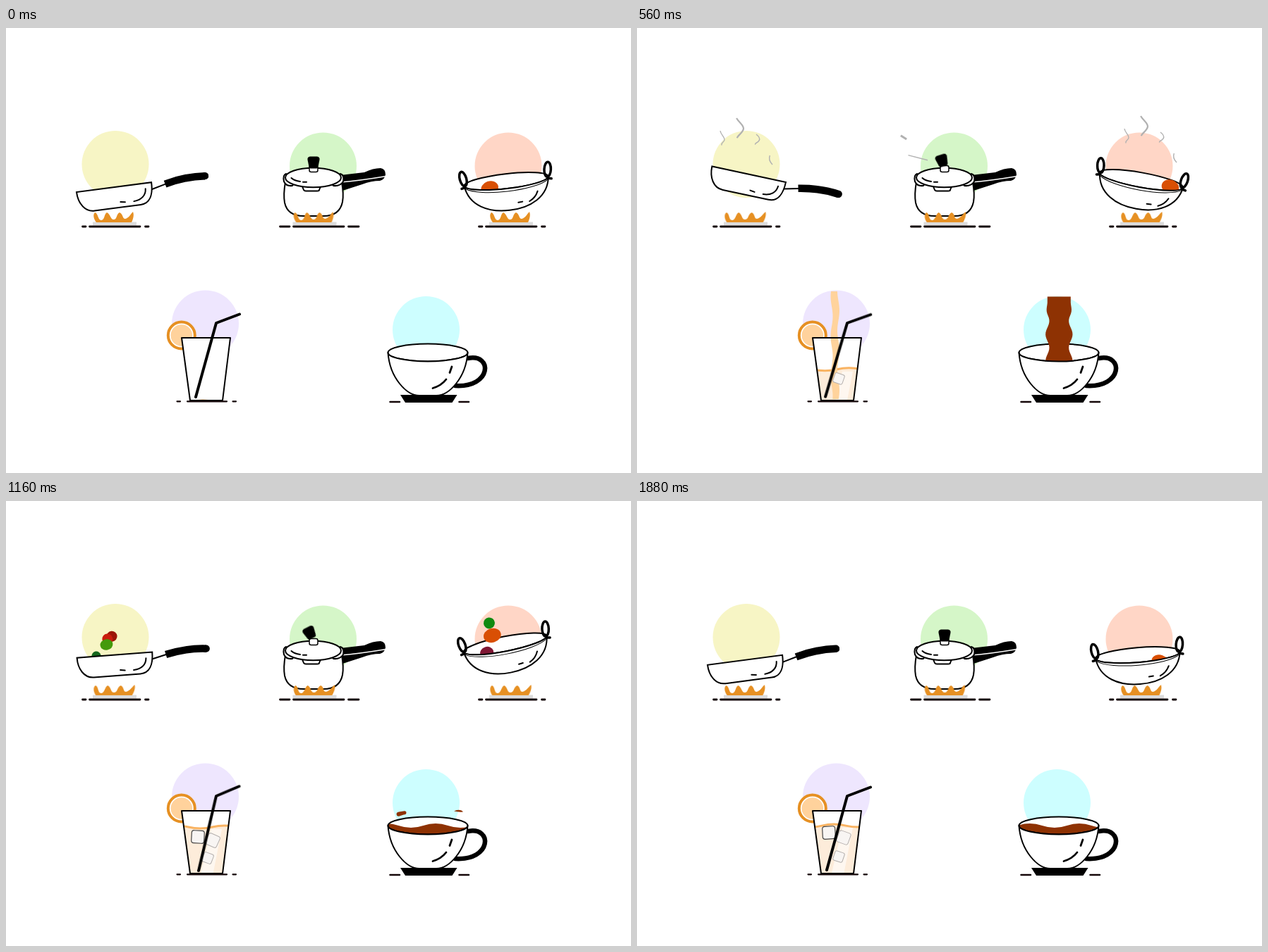
An HTML page for the animation above (1.92 s loop, 886x632 px).

```html
<!DOCTYPE html>
<html lang="en">
<head>
<meta charset="utf-8">
<title>Kitchen loop</title>
<style>
html, body { margin: 0; width: 100%; height: 100%; overflow: hidden; background: #fff; }
svg { display: block; width: 886px; height: 632px; }
.ink { fill: none; stroke: #000; stroke-width: 2; stroke-linecap: round; stroke-linejoin: round; }
.thin { stroke-width: 1; }
.thick { stroke-width: 3.5; }
.paper { fill: #fff; }
.ground { stroke: #140608; stroke-width: 2.8; }
.coffee { fill: #8e3203; }
.cube { fill: #f8f5f3; stroke: #444; stroke-width: 1.2; }
.pale { stroke: #b5b0ae; stroke-width: 1; }

/* A dash of --len slides along each trail, from before its start to past its end. */
.trail {
  fill: none; stroke: #b1b1b1; stroke-width: var(--w, 1.4);
  stroke-dasharray: var(--len, 60) 200; stroke-dashoffset: var(--len, 60);
  animation: drift 1920ms linear var(--wait) infinite;
}
.puff { animation-name: burst; }
@keyframes drift { 0% { stroke-dashoffset: var(--len, 60); } 31.25%, 100% { stroke-dashoffset: -100; } }
@keyframes burst { 0% { stroke-dashoffset: var(--len); } 11.5%, 100% { stroke-dashoffset: -100; } }

.flame { fill: #e69023; transform-origin: 152px 276px; animation: lick 640ms ease-in-out infinite; }
@keyframes lick { 0%, 50%, 100% { transform: none; } 85% { transform: skewX(-6deg) scaleX(1.03); } }

#weight { animation: whistle 1920ms ease-out infinite; }
@keyframes whistle {
  0%, 26%, 96%, 100% { transform: translate(436px, 202px); }
  33%, 90% { transform: translate(435.5px, 197px) rotate(-27deg); }
}
#straw { stroke-width: 4; transform-origin: 298px 419px; animation: stir 1920ms ease-in-out infinite; }
@keyframes stir { 0%, 100% { transform: none; } 29% { transform: rotate(1deg); } 60% { transform: rotate(-2.2deg); } }
</style>
</head>
<body>
<svg viewBox="0 0 886 632">
  <defs>
    <marker id="tip" viewBox="-1 -1 2 2" markerWidth="1" markerHeight="1"><circle r="1"/></marker>
    <clipPath id="inGlass"><path d="M249 440H318L307 529H261Z"/></clipPath>
    <clipPath id="inCup"><ellipse cx="598" cy="461" rx="56.5" ry="12.5"/></clipPath>
  </defs>

  <!-- frying pan, drawn around its pivot -->
  <circle cx="155" cy="193.5" r="47.5" fill="#f7f5c5"/>
  <g class="steam"></g>
  <g id="panFood"></g>
  <g class="pan"><g class="ink" transform="translate(-53.5 -16.6)">
    <path d="M106 10L126.500 5"/>
    <path d="M126 5Q156 -2 183.500 1" style="stroke-width:10.500;stroke-linecap:butt" marker-end="url(#tip)"/>
    <path class="paper" d="M0 0C0 16 8 29.500 22 29.500H88C101 29.500 107 18 107 0Z" stroke-linejoin="miter"/>
    <path d="M79 23.500C90 23 97 17 97.500 8M60 22L66.500 23"/>
  </g></g>
  <g class="stove"></g>
  <path class="ink ground" d="M118.500 282H190M108.500 282H113M197.500 282H202"/>

  <!-- pressure cooker -->
  <circle cx="449.500" cy="196" r="47.500" fill="#d5f6c8"/>
  <path class="trail puff" pathLength="100" style="--len:15;--w:3;--wait:400ms" d="M420 182L365 147"/>
  <path class="trail puff" pathLength="100" style="--len:52;--wait:450ms" d="M425 191L372 177.500"/>
  <path class="trail puff" pathLength="100" style="--len:41;--w:2.200;--wait:705ms" d="M444 185L468 153"/>
  <path class="trail puff" pathLength="100" style="--len:28;--w:2.200;--wait:705ms" d="M444 194L462 183"/>
  <path d="M474 209L508 205Q520 199 531 199Q538 200 538 208Q537 215 530 217Q518 217 505 222L474 232Z"/>
  <path d="M474 219Q500 217 539 210.500" fill="none" stroke="#fff" stroke-width="1.600"/>
  <g class="ink">
    <path class="paper" d="M396 219Q393 236 395 248Q399 267 422 267H450Q473 267 477 247Q479 236 476 219Z"/>
    <path class="paper" d="M397 207Q392 209 394 218Q397 225 406 224L409 220M474 207Q480 209 478 218Q474 225 464 224L462 220"/>
    <path class="paper" d="M420 225L422 230Q423 231.500 425 231.500H441Q444 231.500 444 230L446 225"/>
    <ellipse class="paper" cx="435.500" cy="212.500" rx="39.500" ry="13.700"/>
    <path d="M404.500 213Q409 217 417 218M421 218.700H426"/>
    <rect class="paper" x="430" y="195.500" width="12" height="9" rx="2.500" stroke-width="1.500"/>
  </g>
  <path id="weight" d="M-5 -19.500H5Q9 -19 8.500 -15L6.500 -5Q6 -2.500 4 -2.500H-4Q-6 -2.500 -6.500 -5L-8.500 -15Q-9 -19 -5 -19.500Z"/>
  <g class="stove" transform="translate(283.500)"></g>
  <path class="ink ground" d="M407.500 282H479M388.500 282H402M485.500 282H500"/>

  <!-- wok, drawn around the middle of its handles -->
  <circle cx="712" cy="196" r="47.500" fill="#ffd6c6"/>
  <g class="steam" transform="translate(573 -3)"></g>
  <g class="wok"><g class="ink" transform="translate(0 -31)"><ellipse class="paper" cx=".5" cy="11" rx="60" ry="10.500"/></g></g>
  <g id="wokFood"></g>
  <g class="wok"><g class="ink" transform="translate(0 -31)">
    <path class="paper" d="M-59.500 11A60 10.500 0 0 0 60.500 11C57 40 30 52.500 .5 52.500C-29 52.500 -56 40 -59.500 11Z"/>
    <path class="thin" d="M-58.500 15C-40 29 41 29 59.500 15"/>
    <path d="M30 43Q39 39 43 30M14 43L20 42.500"/>
    <g class="thick">
      <ellipse cx="-60" cy="1" rx="4.700" ry="10.500" transform="rotate(-9 -60 1)"/>
      <ellipse cx="60.500" cy="1" rx="4.700" ry="10.500" transform="rotate(9 60.500 1)"/>
      <path d="M-63.500 14.500L-59 13.500M64.500 14.500L60 13.500"/>
    </g>
  </g></g>
  <g class="stove" transform="translate(562)"></g>
  <path class="ink ground" d="M680.500 282H752M670.500 282H675M759.500 282H764"/>

  <!-- iced drink -->
  <circle cx="282.500" cy="420" r="47.500" fill="#eee6fe"/>
  <circle cx="248.800" cy="436.500" r="19" fill="#fff" stroke="#e69023" stroke-width="4"/>
  <circle cx="248.800" cy="436.500" r="15.300" fill="#ffd29c"/>
  <path class="paper" d="M249 440H318L307 529H261Z"/>
  <g clip-path="url(#inGlass)">
    <g id="juice">
      <path class="ripple" fill="#fdecda" d="M194 0q17 -4 34 0t34 0t34 0t34 0t34 0V110H194Z"/>
      <path fill="#fff" opacity=".6" d="M291 3H306L285 110H266Z"/>
      <path class="ripple" fill="none" stroke="#f9b362" stroke-width="3" d="M194 0q17 -4 34 0t34 0t34 0t34 0t34 0"/>
    </g>
    <path id="splash" fill="#fac88c" d="M255 465L270 456L266 450L284 458L276 462ZM296 459L312 467L302 468Z"/>
  </g>
  <path id="pour" fill="#ffd39c"/>
  <g clip-path="url(#inGlass)">
    <rect class="cube ice pale" x="-7" y="-7" width="14" height="14" rx="2.500"/>
    <rect class="cube ice pale" x="-8.500" y="-8.500" width="17" height="17" rx="3"/>
    <rect class="cube ice" x="-9" y="-9" width="18" height="18" rx="3.500"/>
  </g>
  <path class="ink" d="M249 440H318L307 529H261Z" stroke-linejoin="miter"/>
  <path class="ink ground" style="stroke-width:2.200" d="M257 530.300H313M242.500 530.300H247M321.500 530.300H326"/>
  <path id="straw" class="ink" d="M269 524L298 419L331 406.500"/>

  <!-- coffee -->
  <circle cx="595.500" cy="428.500" r="47.500" fill="#cdfeff"/>
  <path class="ink" style="stroke-width:6.500" d="M655 469C690 462 689 511 637 508"/>
  <ellipse class="paper" cx="598" cy="461" rx="56.500" ry="12.500"/>
  <g clip-path="url(#inCup)">
    <path id="coffee" class="coffee" d="M469.500 0q17.500 -6 35 0t35 0t35 0t35 0t35 0t35 0t35 0t35 0V40H469.500Z"/>
  </g>
  <ellipse class="ink" cx="598" cy="461" rx="56.500" ry="12.500"/>
  <path id="brew" class="coffee"/>
  <rect id="sugar" class="ink paper" style="fill:#fff;stroke-width:1.700" x="-8" y="-8" width="16" height="16"/>
  <g class="ink">
    <path class="paper" d="M541.500 461A56.500 12.500 0 0 0 654.500 461C652 497 628 522 610 522H586C568 522 544 497 541.500 461Z"/>
    <path style="stroke-width:2.800" d="M605 511.500Q617 508 624 499M629 489.500L632 481"/>
  </g>
  <path id="dropA" class="coffee" d="M-7 0Q-7 -3 -3 -3L5 -3Q8 -2 7 0Q7 2.500 3 2L-4 3Q-7 3 -7 0Z"/>
  <path id="dropB" class="coffee" d="M-6.500 0Q-3 -2 0 -1.800Q5 -1.500 6.500 1Q0 1.500 -6.500 0Z"/>
  <path d="M559 521H639.500L632.500 532H566Z"/>
  <path class="ink ground" style="stroke-width:2.500" d="M544.500 531H558M642.500 531H656"/>
</svg>
<script>
const LOOP = 1920, TOSS = LOOP / 2, TAU = Math.PI * 2;
const { sin, cos, min, max, abs, exp } = Math;
const all = sel => [...document.querySelectorAll(sel)];
const fill = (sel, html) => all(sel).forEach(el => { el.innerHTML = html; });

fill('.stove', '<rect x="123" y="275.5" width="62" height="5" fill="#dcdcdc"/>' +
  '<path class="flame" d="M128 276C124 271 123 265 126 262C131 263 130 273 135 273C140 273 139 264 143 262C148 264 148 272 152.5 272C158 272 156 264 161 262C166 264 165 271 169 271C174 270 176 265 180 261C182 266 180 272 178 276Z"/>');
const wisp = (wait, w, d) => `<path class="trail" pathLength="100" style="--wait:${wait}ms;--w:${w}" d="${d}"/>`;
fill('.steam',
  wisp(180, 1.4, 'M126 182C120 174 121 170 120 166C119 162 125 162 124 158C123 153 119 152 118 146') +
  wisp(220, 2.2, 'M152 170C151 164 143 164 142 159C140 153 150 150 151 143C151 136 142 134 139 123') +
  wisp(180, 1.4, 'M169 179C169 173 166 168 168 164C172 162 178 158 169 151') +
  wisp(440, 1.4, 'M192 194C186 188 187 180 191 178C200 174 202 168 196 157'));

// Each piece flies through its highest point (x, y) at time t of a toss.
const panFood = [
  { rx: 6.5, ry: 6.5, color: '#14661c', t: 285, x: 134, y: 200.5, vx: .07, depth: 20 },
  { rx: 7.5, ry: 7.5, color: '#9c1508', t: 244, x: 158, y: 187, vx: .18, depth: 20 },
  { rx: 7.5, ry: 7.5, color: '#c91c0c', t: 251, x: 152, y: 189, vx: .16, depth: 20 },
  { rx: 9, ry: 7.7, color: '#449a0c', t: 285, x: 151, y: 184.5, vx: .1, depth: 20 }
];
const wokFood = [
  { rx: 8, ry: 8, color: '#108a10', t: 417, x: 694, y: 174, vx: .27, depth: 23 },
  { rx: 8, ry: 8, color: '#108a10', t: 259, x: 699.5, y: 164, vx: .246, depth: 32 },
  { rx: 9.8, ry: 8.5, color: '#7f1734', t: 344, x: 687, y: 159.5, vx: .21, pull: .0012, depth: 32 },
  { rx: 12.5, ry: 10, color: '#d94f04', t: 329, x: 697, y: 146, vx: .214, pull: .0012, depth: 21, rests: true }
];
function addFood(sel, foods) {
  fill(sel, foods.map(f => `<ellipse rx="${f.rx}" ry="${f.ry}" fill="${f.color}"/>`).join(''));
  all(sel + ' ellipse').forEach((el, i) => { foods[i].el = el; });
}
addFood('#panFood', panFood);
addFood('#wokFood', wokFood);

const clamp = (v, a, b) => min(b, max(a, v));
const part = (t, start, length) => clamp((t - start) / length, 0, 1);
const hop = (t, start, length) => { const u = part(t, start, length); return 4 * u * (1 - u); };
const pulse = (p, peak) => cos(Math.PI * (p - peak) / TOSS) ** 2;
const show = (el, on) => el.setAttribute('visibility', on ? 'visible' : 'hidden');
const place = (el, x, y, turn = 0, size = 1) =>
  el.setAttribute('transform', `translate(${x} ${y}) rotate(${turn}) scale(${size})`);
const [juice, splash, pour, coffee, brew, sugar, dropA, dropB] =
  ['juice', 'splash', 'pour', 'coffee', 'brew', 'sugar', 'dropA', 'dropB'].map(id => document.getElementById(id));
const pans = all('.pan'), woks = all('.wok'), ripples = all('.ripple'), ices = all('.ice');

function toss(foods, p, lift) {
  const gravity = .0027, reach = 155, slide = .04;
  for (const f of foods) {
    const u = p - f.t, v = clamp(u, -reach, reach);
    const fall = f.y + gravity * u * u, rest = lift + f.depth;
    const x = f.x + f.vx * v + (f.pull || 0) * v * v - slide * abs(u - v);
    place(f.el, x, min(fall, rest), v / 8);
    show(f.el, f.rests || fall < rest);
  }
}

// Falling liquid between two heights; edge(y) gives the [left, right] offsets.
function stream(el, cx, top, bottom, edge) {
  const left = [], right = [];
  for (let y = top; y < bottom + 3; y += 3) {
    const h = min(y, bottom), [a, b] = edge(h);
    left.push(`${cx + a} ${h}`);
    right.unshift(`${cx + b} ${h}`);
  }
  el.setAttribute('d', bottom > top ? `M${[...left, ...right].join('L')}Z` : '');
}

function drawVessels(p) {
  const swing = pulse(p, 480), panLift = 226 - 20 * swing;
  pans.forEach(el => place(el, 155.2, panLift + 16.6, -7.5 + 22.5 * swing ** 2));
  toss(panFood, p, panLift);

  const a = TAU * (p - 320) / TOSS, wokLift = 208.5 - 21 * pulse(p, 300) ** 2;
  woks.forEach(el => place(el, 711, wokLift + 31, 12 * sin(a + .54 * sin(a))));
  toss(wokFood, p, wokLift);
}

function drawDrink(t) {
  const level = 531 - 70 * (1 - exp(-max(0, t - 300) / 240));
  place(juice, 0, level);
  ripples.forEach(el => place(el, 17 - 17 * cos(TAU * t / LOOP), 0));
  place(splash, 0, 8 - 8 * hop(t, 720, 160));
  show(splash, t > 720 && t < 880);

  const sway = y => 1.5 * sin(y / 9 - t / 90);
  stream(pour, 281, 374 + 153 * part(t, 640, 320), min(374 + 153 * part(t, 160, 160), t > 700 ? 462 : 527),
    y => [sway(y) - 5, sway(y + 8) + 4.5]);

  const rests = [[286, 506, 20], [293, 480, 22], [272, 474, 0]];
  ices.forEach((el, i) => {
    const [x, y, turn] = rests[i];
    const bob = (i + 1) * cos(TAU * (t - 1160) / 1480);
    place(el, x, y + bob - 80 * (1 - part(t, 460 + 90 * i, 110)), turn + bob);
  });
}

function drawCoffee(t) {
  const bulge = y => 16.5 + 2.7 * part(y, 390, 20) * cos(TAU * (y - 435 + (t - 560) / 20) / 38);
  stream(brew, 598.3, 381.5 + 98 * part(t, 900, 170), 381.5 + 98 * part(t, 280, 170), y => [-bulge(y), bulge(y)]);
  place(coffee, -10 + 10 * cos(TAU * t / LOOP), 478 - 17 * part(t, 560, 380));

  const floating = t > 1330;
  if (floating) place(sugar, 621, 490 - 37 * hop(t, 1330, 220), -14, 1.3);
  else place(sugar, 631.5 - (t - 720) / 40, 386 + .65 * (t - 720));
  show(sugar, (t >= 720 && t < 870) || (floating && t < 1550));

  const u = part(t, 1060, 200), up = 15 * hop(t, 1060, 200);
  place(dropA, 566 - 11 * u, 459 - up, -4 - 12 * u);
  place(dropB, 635 + 13 * u, 455.5 - up, 8 * u - 4);
  [dropA, dropB].forEach(el => show(el, u > 0 && u < 1));
}

let start;
function frame(now) {
  start ??= now;
  const t = (now - start) % LOOP;
  drawVessels(t % TOSS);
  drawDrink(t);
  drawCoffee(t);
  requestAnimationFrame(frame);
}
requestAnimationFrame(frame);
</script>
</body>
</html>
```
